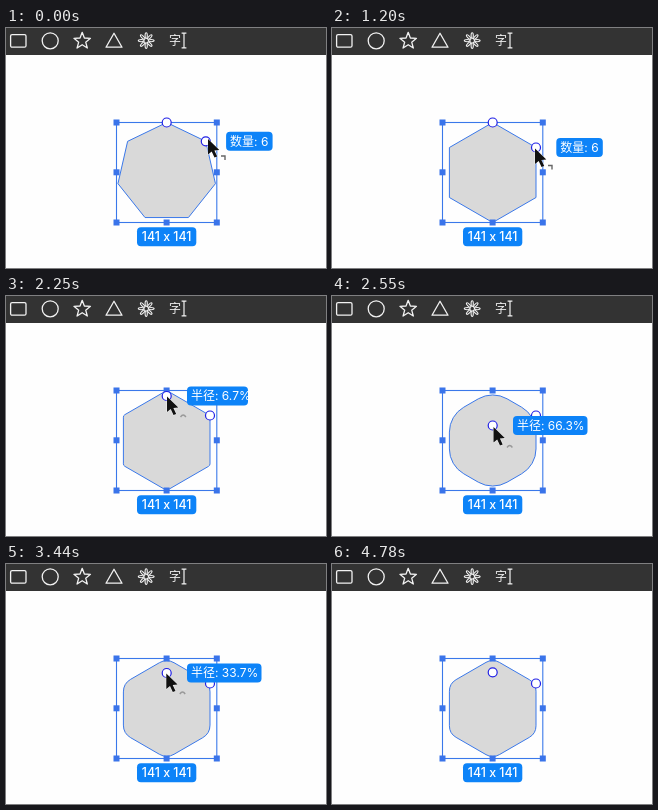
An HTML page for the animation above (5380 ms loop, 320 by 240 pixels).

```html
<!DOCTYPE html>
<html lang="zh-CN">
<head>
<meta charset="utf-8">
<title>多边形编辑</title>
<style>
  html, body { margin: 0; width: 100%; height: 100%; overflow: hidden; background: #fefefe; }
  svg { display: block; width: 100vw; height: 100vh; }
  text { font: 400 12px Inter, "Noto Sans CJK SC", "Noto Sans CJK", sans-serif; fill: #fff; }
  .icons { fill: none; stroke: #f2f2f2; stroke-width: 1.3; stroke-linejoin: round; }
  .icons text { fill: #f2f2f2; stroke: none; }
  .tag { fill: #0d83f8; }
  .knob { fill: #fff; stroke: #1f1fe6; stroke-width: 1.2; }
  #size { font-size: 12.4px; font-weight: 500; text-anchor: middle; }
</style>
</head>
<body>
<svg viewBox="0 0 320 240">
  <rect width="320" height="240" fill="#fefefe"/>
  <rect width="320" height="27" fill="#333"/>
  <g class="icons">
    <rect x="4.6" y="6.6" width="15.4" height="12.6" rx="1.5"/>
    <circle cx="44.2" cy="12.8" r="8"/>
    <path id="star"/>
    <path d="M108 5.2 L116 19.2 H100 Z"/>
    <g id="burst" stroke-width="1.1"></g>
    <text x="163" y="17.2">字</text>
    <path d="M175.6 5.2 H180.4 M178 5.2 V19.8 M175.6 19.8 H180.4" stroke-width="1.2"/>
  </g>
  <path id="shape" fill="#d9d9d9" stroke="#3a78ea"/>
  <rect x="110.5" y="94.5" width="100.3" height="100" fill="none" stroke="#3a78ea" stroke-width="1.1"/>
  <g id="grips" fill="#3a74ea"></g>
  <rect class="tag" x="131" y="199.3" width="59.3" height="19" rx="4"/>
  <text id="size" x="160.6" y="213.4">141 x 141</text>
  <circle id="countKnob" class="knob" r="4.5"/>
  <circle id="radiusKnob" class="knob" r="4.5"/>
  <g id="label">
    <rect class="tag" height="19" rx="4"/>
    <text x="4" y="13.9"></text>
  </g>
  <g id="cursor">
    <path d="M0 0 V15.6 L3.7 12.4 L6.5 18.6 L9.2 17.4 L6.4 11.4 L11.3 11 Z"
      fill="#111" stroke="#fff" stroke-width=".7" stroke-linejoin="round" paint-order="stroke"/>
    <path id="hint" fill="none" stroke-width="1.4"/>
  </g>
</svg>
<script>
const LOOP = 5380, STEP = 149.37, LAST = 35;
const CX = 160.7, CY = 144.5, R = 50;
const $ = id => document.getElementById(id);
const set = (el, attrs) => { for (const k in attrs) el.setAttribute(k, attrs[k]); };
const add = (parent, tag, attrs) => {
  const el = document.createElementNS('http://www.w3.org/2000/svg', tag);
  set(el, attrs);
  parent.append(el);
};

// Point at a clockwise angle from the top
const polar = (x, y, r, a) => [x + r * Math.sin(a), y - r * Math.cos(a)];
const corner = (i, n) => polar(CX, CY, R, i * 2 * Math.PI / n);

// Keys are [step, value, ...]; linear between them
function track(keys, s) {
  if (s <= keys[0][0]) return keys[0].slice(1);
  for (let i = 1; i < keys.length; i++) {
    const a = keys[i - 1], b = keys[i];
    if (s <= b[0]) {
      const k = (s - a[0]) / (b[0] - a[0]);
      return a.slice(1).map((v, j) => v + (b[j + 1] - v) * k);
    }
  }
  return keys[keys.length - 1].slice(1);
}

const POINTER = [
  [0, 202, 111], [1, 202, 113], [5, 203, 120], [7, 203, 120], [8, 203, 120.5],
  [9, 189, 113], [10, 167, 100], [11, 160.5, 97], [12, 160.5, 97], [13, 161, 98],
  [14, 161, 98], [15, 161, 100.5], [17, 161.5, 131], [19, 161.5, 138], [21, 161, 132.5],
  [23, 160.3, 109.5], [25, 160.3, 108.5], [27, 160.3, 108.5], [28, 166, 117],
  [29, 187, 143], [30, 214, 178], [31, 243, 216], [32, 262, 245]
];
// Rounding in percent, and height of its knob
const ROUNDING = [
  [14, 0, 94.5], [15, 6.7, 100], [17, 66.3, 129.5], [19, 91.6, 138],
  [21, 79.1, 132.5], [23, 33.7, 109], [25, 30.9, 108.3]
];

function roundedPolygon(n, pct) {
  const cut = R * Math.sin(Math.PI / n) * pct / 100;
  const r = R * Math.cos(Math.PI / n) * pct / 100;
  const side = 2 * R * Math.sin(Math.PI / n);
  const toward = (p, q) => p.map((v, i) => (v + (q[i] - v) * cut / side).toFixed(2));
  let d = '';
  for (let i = 0; i < n; i++) {
    const p = corner(i, n);
    d += (i ? 'L' : 'M') + toward(p, corner(i - 1, n));
    if (pct) d += `A${r} ${r} 0 0 1 ${toward(p, corner(i + 1, n))}`;
  }
  return d + 'Z';
}

function buildStatic() {
  const pts = Array.from({ length: 10 }, (_, i) =>
    polar(76.2, 13, i % 2 ? 3.7 : 8.7, i * Math.PI / 5).map(v => v.toFixed(2)));
  set($('star'), { d: 'M' + pts.join('L') + 'Z' });
  for (let i = 0; i < 8; i++) {
    add($('burst'), 'ellipse', {
      cx: 145.2, cy: 12.6, rx: 2.9, ry: 1.1, transform: `rotate(${i * 45} 140.2 12.6)`
    });
  }
  for (const x of [110.5, 160.6, 210.8])
    for (const y of [94.5, 144.3, 194.5])
      if (x !== 160.6 || y !== 144.3)
        add($('grips'), 'rect', { x: x - 3, y: y - 3, width: 6, height: 6 });
}

function showLabel(text, x, y, width) {
  const [box, words] = $('label').children;
  set($('label'), { transform: `translate(${x + 20.3} ${y - 9.5})` });
  set(box, { width });
  words.textContent = text;
}

function draw(time) {
  const s = Math.min(LAST, Math.floor(time % LOOP / STEP));
  const n = s < 1 ? 7 : 6;
  const [pct, knobY] = track(ROUNDING, s);
  const [kx, ky] = corner(1, n);
  const [px, py] = track(POINTER, s);
  const counting = s <= 8;
  const rounding = s >= 11 && s <= 28;

  set($('shape'), { d: roundedPolygon(n, pct) });
  set($('countKnob'), { cx: kx, cy: ky });
  set($('radiusKnob'), { cx: 160.7, cy: knobY });

  set($('label'), { visibility: counting || rounding ? 'visible' : 'hidden' });
  if (counting) showLabel('数量: 6', kx, ky, 46.5);
  if (rounding) showLabel(`半径: ${pct ? pct.toFixed(1) : 0}%`, 160.7, knobY, pct < 10 ? 61 : 74.5);

  set($('cursor'), {
    transform: `translate(${px} ${py})`,
    visibility: s < 32 ? 'visible' : 'hidden'
  });
  set($('hint'), counting
    ? { d: 'M13 17 h4 v4', stroke: '#666' }
    : { d: rounding ? 'M13.5 20.5 q2.7 -4 5.4 0' : '', stroke: '#999' });
}

buildStatic();
const start = performance.now();
function tick() {
  draw(performance.now() - start);
  requestAnimationFrame(tick);
}
tick();
</script>
</body>
</html>
```
